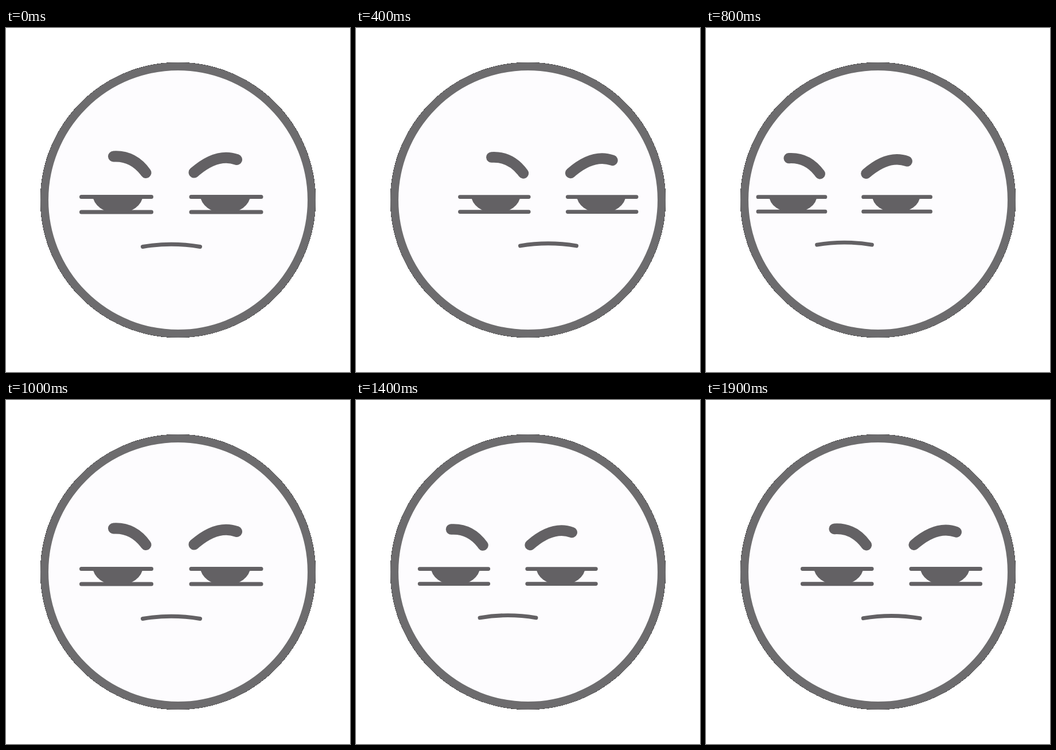
These frames come from a looping animation (600x600 px, 2 s). An HTML page:

```html
<!DOCTYPE html>
<html lang="en">
<head>
<meta charset="utf-8">
<title>Skeptical face</title>
<style>
  html, body { margin: 0; width: 100%; height: 100%; overflow: hidden; background: #fff; }
  svg { display: block; width: 100%; height: 100%; }
  .line { fill: none; stroke: #636164; stroke-linecap: round; }
  .lid, .mouth { stroke-width: 7; }
  .brow { stroke-width: 19; }
  .iris { fill: #636164; }
</style>
</head>
<body>
<svg viewBox="0 0 600 600">
  <defs>
    <path id="iris" class="iris" d="M-43.5 292A43.5 31 0 0 0 43.5 292Z"/>
    <path id="lids" class="line lid" d="M-61 294.5H61M-61 321H61"/>
  </defs>
  <!-- Hard-edged disc gives the ring its jagged dark rim. -->
  <circle cx="300" cy="300" r="240.4" fill="#333" shape-rendering="crispEdges"/>
  <circle cx="300" cy="300" r="233" fill="#fdfcfe" stroke="#6d6c6e" stroke-width="14"/>
  <g id="face">
    <path class="line brow" d="M187.5 224Q222 222 244 252.5M328 252Q368 217 402.5 229.5"/>
    <use href="#lids" x="192.5"/>
    <use href="#lids" x="384"/>
    <use href="#iris" x="195"/>
    <use href="#iris" x="382.5"/>
    <path class="line mouth" d="M238.5 381.5Q288 373 338.5 381.5"/>
  </g>
</svg>
<script>
  const LOOP = 2000, STEP = 100, REACH = 47;
  const face = document.getElementById('face');

  // Sweeps of the gaze: [start ms, end ms, from, to], -1 is left and 1 is right.
  const sweeps = [
    [0, 400, 0, 1],
    [400, 800, 1, -1],
    [800, 1200, -1, 1],
    [1200, 2000, -1, 1]
  ];

  function gazeAt(time) {
    const [start, end, from, to] = sweeps.find(sweep => time <= sweep[1]);
    return from + (to - from) * (time - start) / (end - start);
  }

  // The face shrinks as it turns away, more so to the left.
  const scaleAt = gaze => gaze > 0 ? 1 - 0.019 * gaze * gaze : 1 + 0.041 * gaze;

  function draw(now) {
    const gaze = gazeAt(Math.floor(now % LOOP / STEP) * STEP);
    face.setAttribute('transform',
      `translate(${288 + REACH * gaze} 300) scale(${scaleAt(gaze)}) translate(-288 -300)`);
  }

  const begin = performance.now();
  function tick() {
    draw(performance.now() - begin);
    requestAnimationFrame(tick);
  }
  tick();
</script>
</body>
</html>
```
